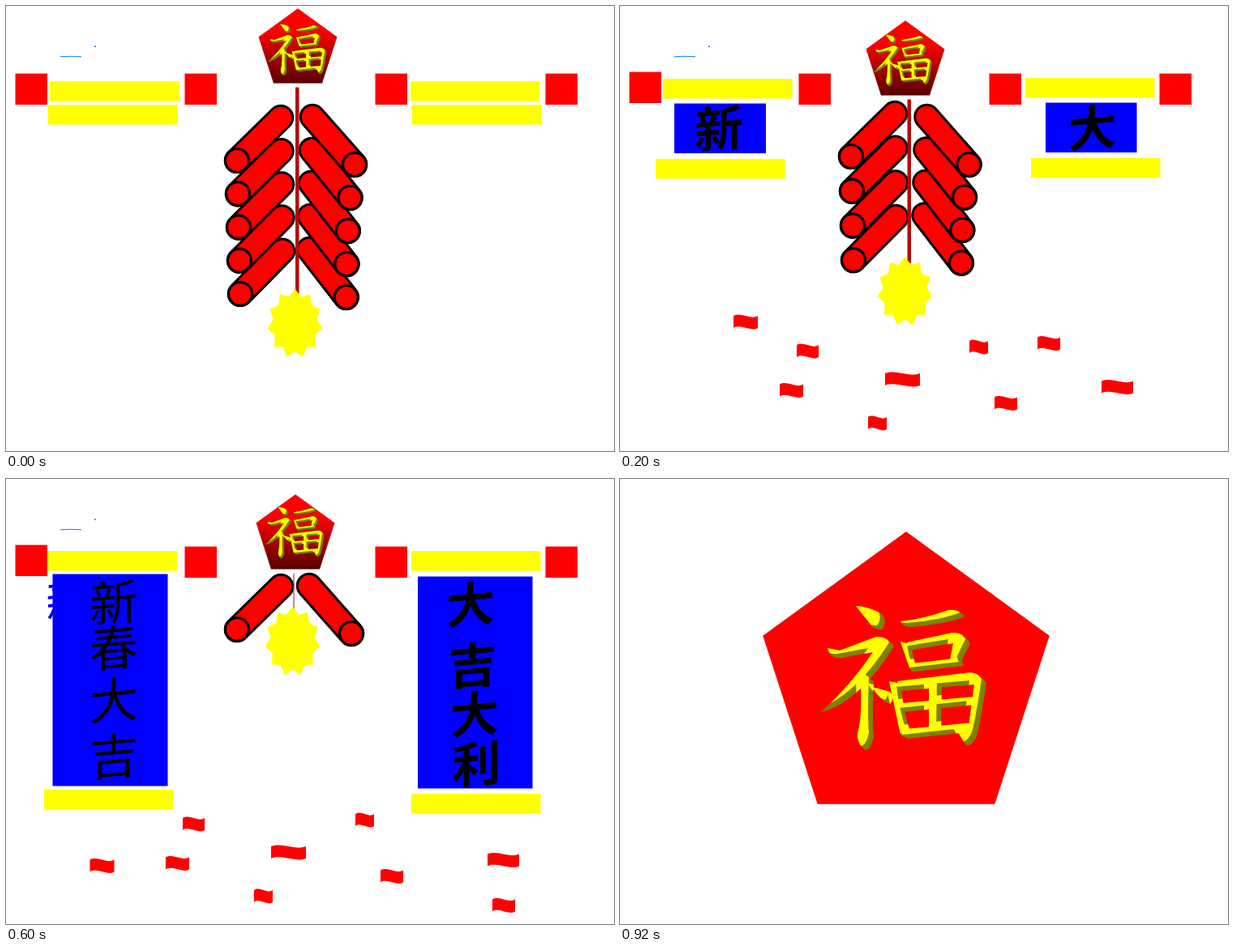
These frames come from a looping animation (750 px wide and 550 px high, 1000 ms). An HTML page:

```html
<!DOCTYPE html>
<html lang="zh">
<head>
<meta charset="utf-8">
<title>新春大吉</title>
<style>
  html, body { margin: 0; width: 100%; height: 100%; overflow: hidden; background: #fff; }
  svg { display: block; width: 750px; height: 550px; }
  .scene { opacity: 0; }
  text { font-family: "Noto Sans CJK SC", "Noto Sans CJK", sans-serif; text-anchor: middle; }
</style>
</head>
<body>
<svg id="stage" viewBox="0 0 750 550" role="img" aria-label="福 新年 新春大吉 大吉大利">
  <defs>
    <linearGradient id="shade" x1="0" y1="0" x2="0" y2="1">
      <stop offset=".3" stop-color="#f00"/>
      <stop offset="1" stop-color="#500"/>
    </linearGradient>
    <path id="luck" d="M291 157Q304 157 322 166Q331 175 323 186Q312 187 307 177Z
      M256 209L271 212L316 195Q331 195 338 207Q315 244 290 265Q270 283 248 288Q285 255 312 214L274 221Q260 223 256 209Z
      M296 238L313 250Q311 300 313 318Q310 335 302 335Q292 326 293 315Q300 290 296 238Z
      M311 257L333 263Q340 270 333 278Q321 274 311 257Z
      M346 176Q375 173 405 162Q418 160 425 170Q405 179 358 183Q348 183 346 176Z
      M346 201L360 205Q361 225 368 236Q361 242 357 233Z
      M354 202L410 190Q424 189 432 203L419 230L406 230L411 203L356 212Z
      M361 228L420 221L424 231L363 238Z
      M332 250L346 253Q350 290 359 315Q353 323 346 316Z
      M342 250L425 240Q441 236 452 252Q445 300 440 318Q434 331 427 329Q416 313 414 305L430 307L437 254L345 262Z
      M381 248L397 250L396 314L381 314Z
      M349 277L437 269L437 279L350 288Z
      M352 309L437 301L437 312L354 321Z"/>
    <clipPath id="luckClip"><use href="#luck"/></clipPath>
  </defs>
</svg>
<script>
const NS = 'http://www.w3.org/2000/svg';
const stage = document.getElementById('stage');
const RED = '#f00', YELLOW = '#ff0', BLUE = '#00f', SKY = '#0080ff';

function add(parent, tag, attrs) {
  const el = document.createElementNS(NS, tag);
  for (const k in attrs) el.setAttribute(k, attrs[k]);
  return parent.appendChild(el);
}

const ink = (width) => width
  ? { stroke: '#000', 'stroke-width': width, 'stroke-linejoin': 'round' } : {};

// The outline stays inside the given size.
function box(g, fill, x, y, w, h, line = 0) {
  add(g, 'rect', { x: x + line / 2, y: y + line / 2, width: w - line, height: h - line, fill, ...ink(line) });
}

function flag(g, [cx, cy, w], line) {
  const h = line ? 19 : 18;
  const p = (x, y) => `${cx + (x - .5) * w} ${cy + (y - .5) * h}`;
  add(g, 'path', {
    d: `M${p(0, .09)}C${p(.333, -.2)} ${p(.667, .38)} ${p(1, .09)}L${p(1, .91)}` +
       `C${p(.667, 1.2)} ${p(.333, .62)} ${p(0, .91)}Z`,
    fill: RED, ...ink(line && 3.5)
  });
}

function star(g, [cx, cy], line) {
  const pts = [];
  for (let i = 0; i < 22; i++) {
    const a = i * Math.PI / 11, k = i % 2 ? .8 : 1;
    pts.push([cx + (34 + line / 2) * k * Math.sin(a), cy - (43 + line / 2) * k * Math.cos(a)]);
  }
  add(g, 'polygon', { points: pts.join(' '), fill: YELLOW, ...ink(line) });
}

function cracker(g, x1, y1, x2, y2) {
  for (const [stroke, w] of [['#000', 32.5], [RED, 26.5]])
    add(g, 'line', { x1, y1, x2, y2, stroke, 'stroke-width': w, 'stroke-linecap': 'round' });
  add(g, 'circle', { cx: x2, cy: y2, r: 14.5, fill: RED, stroke: '#000', 'stroke-width': 3.2 });
}

// Two rows of crackers hang down from the top, the upper ones in front.
function string(g, { count, left, right }) {
  for (let i = count - 1; i >= 0; i--) {
    const ly = left.y + i * left.gap, ry = right.y + i * right.gap;
    cracker(g, right.x - i, ry, right.x + 41 + 11 * .5 ** i, ry + 59);
    cracker(g, 339 + i / 2, ly, 285 + i, ly + 53);
  }
}

function pentagon(g, x, y, k, fill, line) {
  const pts = [[0, 0], [48.5, 35.3], [30, 92.4], [-30, 92.4], [-48.5, 35.3]];
  add(g, 'polygon', { points: pts.map(([a, b]) => [x + a * k, y + b * k]).join(' '), fill, ...ink(line) });
}

// Lit face over a darker body; the body shows at the lower right.
function luck(g, cx, cy, k, edge, width) {
  const s = add(g, 'g', { transform: `translate(${cx} ${cy}) scale(${k}) translate(-349.5 -245.5)` });
  if (edge) add(s, 'use', { href: '#luck', fill: edge, stroke: edge, 'stroke-width': width, 'stroke-linejoin': 'round' });
  add(s, 'use', { href: '#luck', fill: '#808000' });
  const face = add(s, 'g', { 'clip-path': 'url(#luckClip)' });
  add(face, 'use', { href: '#luck', fill: YELLOW, transform: 'translate(-6 -5)' });
}

function glyph(g, char, cx, cy, size, weight, fill = '#000') {
  add(g, 'text', {
    y: size * .38, 'font-size': size, 'font-weight': weight, fill,
    transform: `translate(${cx} ${cy}) skewY(-5)`
  }).textContent = char;
}

function scroll(g, { knobs, bar, sheet, foot, words, x, lean = 0, rows, weight }, line) {
  const grow = line && 7.5;
  const part = (fill, [px, py], w, h) => box(g, fill, px, py, w + grow, h + grow, line);
  if (sheet) box(g, BLUE, ...sheet, line);
  for (const p of [bar, foot]) part(YELLOW, p, 159.5, 24.5);
  for (const p of knobs) part(RED, p, 39.5, 38.5);
  [...(words || '')].forEach((c, i) => glyph(g, c, x + i * lean, rows[i], 60, weight));
}

const knobs = (x, y, step = 210, drop = 0) => [[x, y], [x + step, y + drop]];
const leftKnobs = knobs(11.5, 81.5, 209, 2), rightKnobs = knobs(455.5, 83.5);

// Paper scraps: centre and width.
const scraps = [
  [231.5, 426.5, 27], [211.5, 475, 29], [317.5, 515.5, 23], [348.5, 461.5, 43],
  [442.5, 421.5, 23], [476, 491, 28], [613.5, 471, 39]
];

const scenes = [
  {
    badge: [360, 3], luck: [359, 54], rod: [357, 4.5], star: [356.5, 392.5],
    crackers: { count: 5, left: { y: 138, gap: 41.2 }, right: { x: 378, y: 137, gap: 41 } },
    scrolls: [
      { knobs: knobs(11.5, 83.5, 209), bar: [54, 93], foot: [52, 122] },
      { knobs: rightKnobs, bar: [499, 93], foot: [501, 122] }
    ]
  },
  {
    badge: [352, 18], luck: [348.5, 67], rod: [354.5, 4.5], star: [351.5, 353],
    crackers: { count: 4, left: { y: 133, gap: 42.7 }, right: { x: 378.5, y: 137, gap: 40.5 } },
    scrolls: [
      { knobs: leftKnobs, bar: [53, 90], sheet: [67, 120.5, 113, 61.5], foot: [44, 189],
        words: '新', x: 122, rows: [151], weight: 700 },
      { knobs: rightKnobs, bar: [500, 89], sheet: [525, 119.5, 112.5, 61.5], foot: [507, 188],
        words: '大', x: 582.5, rows: [150], weight: 700 }
    ],
    flags: [...scraps, [155, 390.5, 30], [529, 417, 28]]
  },
  {
    line: 4, badge: [352, 16.5], luck: [348.5, 65], rod: [352.5, 6.5], star: [353.5, 283.5],
    crackers: { count: 3, left: { y: 128, gap: 44 }, right: { x: 373, y: 127, gap: 44 } },
    scrolls: [
      { knobs: knobs(8, 86.5, 194, 2), bar: [52, 93], sheet: [54, 124, 144, 143.5], foot: [42, 267],
        words: '新年', x: 128, rows: [160, 225], weight: 400 },
      { knobs: knobs(442, 76.5), bar: [487, 82], sheet: [494, 115.5, 144, 144.5], foot: [488, 257.5],
        words: '大吉', x: 568, rows: [151, 218], weight: 400 }
    ],
    flags: [
      [155, 390.5, 32], [258.5, 440, 31], [153, 482, 28], [348.5, 400, 45], [356, 465.5, 26], [290.5, 520, 45],
      [443, 421.5, 26], [518, 390, 30], [559, 428.5, 26], [476, 491, 30], [575, 505.5, 40]
    ]
  },
  {
    badge: [357, 19], luck: [356, 66], rod: [354.5, 1], star: [353.5, 201], ghost: true,
    crackers: { count: 1, left: { y: 133, gap: 0 }, right: { x: 374, y: 132, gap: 0 } },
    scrolls: [
      { knobs: leftKnobs, bar: [51.5, 89], sheet: [57.5, 117.5, 142, 262], foot: [47, 384],
        words: '新春大吉', x: 133, rows: [152, 208, 273, 342], weight: 400 },
      { knobs: rightKnobs, bar: [500, 89], sheet: [508, 120.5, 141.5, 262], foot: [500, 389],
        words: '大吉大利', x: 573, lean: 2.5, rows: [154, 230, 290, 352], weight: 600 }
    ],
    flags: [...scraps, [118.5, 478, 30], [614, 527, 28]]
  },
  { big: true }
];

function build(s, index) {
  const g = add(stage, 'g', { class: 'scene' });
  if (s.big) {
    pentagon(g, 353, 65, 3.645, RED);
    luck(g, 349.5, 245.5, 1);
    return g;
  }
  const line = s.line || 0;
  const [bx, by] = s.badge, [rx, rw] = s.rod, top = by + 97.5;
  add(g, 'path', { d: 'M67 62.7Q80 61.8 93 62.7', fill: 'none', stroke: SKY });
  if (!line) add(g, 'circle', { cx: 110, cy: 50, r: 1, fill: SKY });
  if (s.ghost) glyph(g, '新', 79, 150, 60, 500, BLUE);
  s.scrolls.forEach(c => scroll(g, c, line));
  string(g, s.crackers);
  box(g, line ? '#c00' : '#b80808', rx, top, rw, s.star[1] - 35 - top, line && 2);
  star(g, s.star, line);
  pentagon(g, bx, by, line ? 1.03 : 1, 'url(#shade)', line);
  luck(g, ...s.luck, .355, line ? '#000' : '#5a5000', line ? 7 : 2.5);
  (s.flags || []).forEach(f => flag(g, f, line));
  return g;
}

// Each scene holds for one fifth of the loop, then cuts to the next.
const LOOP = 1000, HOLD = LOOP / scenes.length;
scenes.map(build).forEach((g, i) => {
  const run = g.animate([
    { opacity: 1, offset: 0, easing: 'step-end' },
    { opacity: 0, offset: HOLD / LOOP, easing: 'step-end' },
    { opacity: 0, offset: 1 }
  ], { duration: LOOP, iterations: Infinity, delay: i * HOLD - LOOP });
  run.startTime = 0;
});
</script>
</body>
</html>
```
